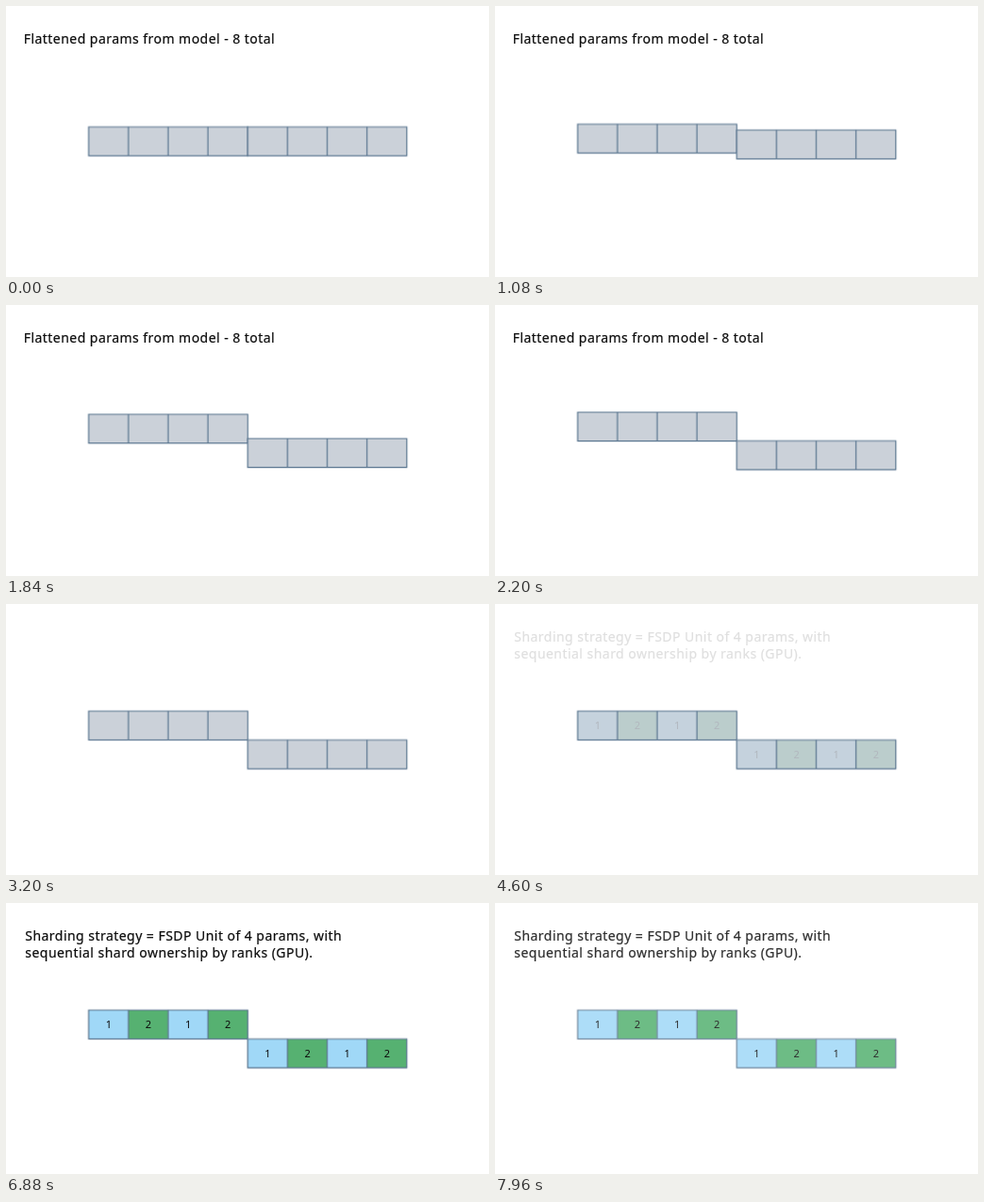
Write an HTML page that moves like this. It is 512 px wide and 288 px high and loops after 8000 ms.

```html
<!DOCTYPE html>
<html lang="en">
<head>
<meta charset="utf-8">
<title>Sharding strategy</title>
<style>
  html, body { margin: 0; width: 100%; height: 100%; overflow: hidden; background: #fff; }
  svg { display: block; width: 100vw; height: 100vh; }
  text { font-family: "Noto Sans", "Open Sans", sans-serif; fill: #0c0c0c; }
  .caption text { font-size: 14px; letter-spacing: .46px; stroke: #0c0c0c; stroke-width: .2px; }
  .digits { font-size: 11px; text-anchor: middle; }
  .grid { fill: none; stroke: #58748e; stroke-width: 1.2px; }

  .upper, .lower, .intro, .result, .scene {
    animation: 8s linear infinite both;
  }
  .upper { animation-name: rise; }
  .lower { animation-name: sink; }
  .intro { animation-name: fade-out; }
  .result { animation-name: fade-in; }
  .scene { animation-name: leave; }

  @keyframes rise {
    0%, 7% { transform: translateY(0); animation-timing-function: cubic-bezier(.37, 0, .63, 1); }
    28.75%, 100% { transform: translateY(-14.7px); }
  }
  @keyframes sink {
    0%, 7% { transform: translateY(0); animation-timing-function: cubic-bezier(.37, 0, .63, 1); }
    28.75%, 100% { transform: translateY(16px); }
  }
  @keyframes fade-out {
    0%, 30.5% { opacity: 1; animation-timing-function: cubic-bezier(.37, 0, .63, 1); }
    40.2%, 100% { opacity: 0; }
  }
  @keyframes fade-in {
    0%, 52.5% { opacity: 0; animation-timing-function: cubic-bezier(.37, 0, .63, 1); }
    73.5%, 100% { opacity: 1; }
  }
  @keyframes leave {
    0%, 92.5% { opacity: 1; animation-timing-function: cubic-bezier(.5, 0, .9, .8); }
    100% { opacity: .84; }
  }
</style>
</head>
<body>
<svg viewBox="0 0 512 288">
  <defs>
    <rect id="base" width="168.6" height="30.6" fill="#cbd1d9"/>
    <rect id="cell" width="42.15" height="30.6"/>
    <path id="grid" class="grid" d="M0 0H168.6V30.6H0ZM42.15 0v30.6M84.3 0v30.6M126.45 0v30.6"/>
    <g id="ranks">
      <use href="#cell" fill="#a0d8f7"/>
      <use href="#cell" x="42.15" fill="#56b171"/>
      <use href="#cell" x="84.3" fill="#a0d8f7"/>
      <use href="#cell" x="126.45" fill="#56b171"/>
      <g class="digits">
        <text x="21.3" y="19.5">1</text>
        <text x="63.4" y="19.5">2</text>
        <text x="105.5" y="19.5">1</text>
        <text x="147.6" y="19.5">2</text>
      </g>
    </g>
  </defs>

  <g class="scene">
    <g class="caption intro">
      <text x="18.7" y="40">Flattened params from model - 8 total</text>
    </g>
    <g class="caption result">
      <text x="20.3" y="40">Sharding strategy = FSDP Unit of 4 params, with</text>
      <text x="20.3" y="58">sequential shard ownership by ranks (GPU).</text>
    </g>

    <g class="upper">
      <g transform="translate(87.6 128.5)">
        <use href="#base"/>
        <use href="#ranks" class="result"/>
        <use href="#grid"/>
      </g>
    </g>
    <g class="lower">
      <g transform="translate(256.2 128.5)">
        <use href="#base"/>
        <use href="#ranks" class="result"/>
        <use href="#grid"/>
      </g>
    </g>
  </g>
</svg>
</body>
</html>
```
